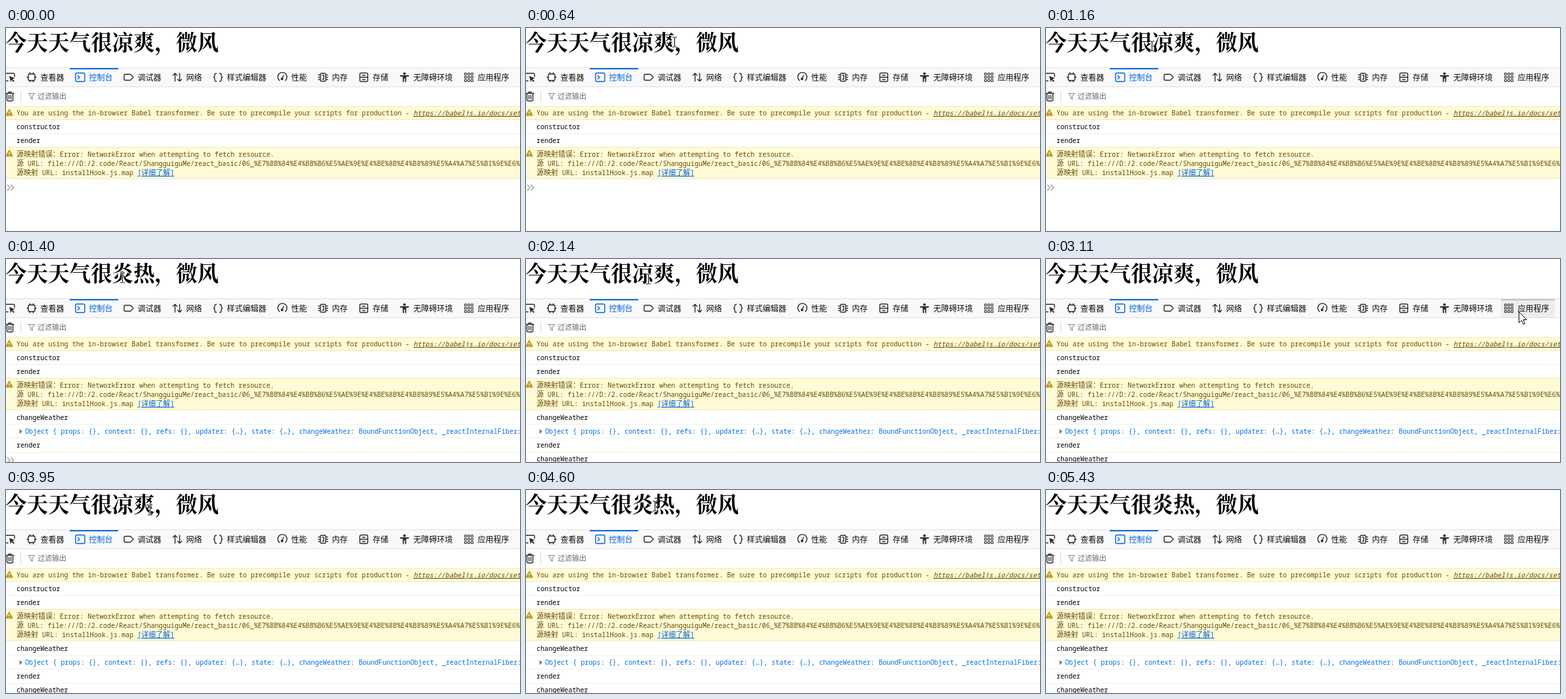
An HTML page for the animation above (5680 ms loop, 783x309 px).

```html
<!DOCTYPE html>
<html lang="zh-CN">
<head>
<meta charset="utf-8">
<title>Console</title>
<style>
  html, body { margin: 0; width: 100%; height: 100%; overflow: hidden; background: #fff; }
  svg { display: block; width: 783px; height: 309px; }
  text { white-space: pre; font-family: "Noto Sans CJK SC", "Noto Sans CJK", sans-serif; }
  .title { font: 700 32.5px "Noto Serif CJK SC", "Noto Sans CJK SC", "Noto Sans CJK", serif; }
  .tab { font-size: 12px; fill: #0c0c0d; }
  .tab.on { fill: #0060df; }
  .log { font: 500 10.08px "Noto Sans Mono", "Noto Sans CJK SC", monospace; fill: #000; }
  .log .han { font: 11px "Noto Sans CJK SC", "Noto Sans CJK", sans-serif; }
  .log.warn { fill: #6a4a00; }
  .log.obj { fill: #0070e0; }
  .sep { fill: #4a4a50; }
  .link { fill: #0060df; text-decoration: underline; }
  .url { font-style: italic; text-decoration: underline; fill: #5e4300; }
  .icon { fill: none; stroke: #2a2a2e; stroke-width: 1.4; stroke-linecap: round; stroke-linejoin: round; }
  .icon.on { stroke: #0060df; }
  .icon .solid { fill: #2a2a2e; stroke: none; }
</style>
</head>
<body>
<svg id="stage" viewBox="0 0 783 309"></svg>
<script>
const LOOP = 5680;

const rect = (x, y, w, h, fill) => `<rect x="${x}" y="${y}" width="${w}" height="${h}" fill="${fill}"/>`;
const han = s => s.replace(/[\u4e00-\u9fff\uff1a]+/g, m => `<tspan class="han">${m}</tspan>`);
const log = (y, s, kind = '', x = 16) => `<text class="log ${kind}" x="${x}" y="${y}">${s}</text>`;
const rule = y => rect(0, y, 783, 1, '#f0f0f1');
const dots = Array.from({ length: 9 }, (_, i) =>
  `<rect x="${1.5 + i % 3 * 5}" y="${1.5 + Math.floor(i / 3) * 5}" width="3" height="3" rx=".8" stroke-width="1.1"/>`).join('');

// name and icon drawn in a 16px box
const ICONS = {
  查看器: '<rect x="3" y="3" width="10" height="10" rx="2"/><path d="M5.5 3V1M10.5 3V1M5.5 15v-2M10.5 15v-2M1 8h2M13 8h2"/>',
  控制台: '<rect x="1" y="1.5" width="14" height="13" rx="2"/><path d="M4.5 5.5L7 8l-2.5 2.5"/>',
  调试器: '<path d="M2.5 3.5h8L15 8l-4.5 4.5h-8q-1.5 0-1.5-1.5V5q0-1.5 1.5-1.5z"/>',
  网络: '<path d="M4.5 14V2M1.500 5l3-3 3 3M11.500 2v12M8.500 11l3 3 3-3"/>',
  样式编辑器: '<path d="M5.5 2Q3 2 3 4.500T1.500 8Q3 8 3 11.500T5.500 14M10.500 2Q13 2 13 4.500T14.500 8Q13 8 13 11.500T10.500 14"/>',
  性能: '<path d="M3.5 13A7 7 0 1 1 12.500 13M7.500 10L10 5"/><circle class="solid" cx="7.5" cy="10.5" r="2"/>',
  内存: '<rect x="4" y="2" width="8" height="12" rx="1.5"/><path d="M1 4.500h2M1 8h2M1 11.500h2M13 4.500h2M13 8h2M13 11.500h2M7 5h2v6H7"/>',
  存储: '<rect x="2" y="1.5" width="12" height="13" rx="2"/><path d="M2 8h12M6 5h4M6 11.500h4"/>',
  无障碍环境: '<circle class="solid" cx="8" cy="2.5" r="2"/><path d="M2 6h12M8 6v3M6.300 6v8.500M9.700 6v8.500" stroke-width="1.8"/>',
  应用程序: dots
};
let edge = 23;
const TABS = Object.entries(ICONS).map(([name, icon]) => {
  const w = 38 + 12 * name.length, x = edge;
  edge += w;
  return { name, icon, x, w, on: name === '控制台' ? 'on' : '' };
});
const tab = ({ name, icon, x, on }) =>
  `<g class="icon ${on}" transform="translate(${x + 8} 67)">${icon}</g>
   <text class="tab ${on}" x="${x + 29.5}" y="79.5">${name}</text>`;

const warnBox = (y, h) => `${rect(0, y, 783, h, '#fffbd6')}
  ${rect(0, y, 783, 1, '#f3eabb')}${rect(0, y + h - 1, 783, 1, '#f3eabb')}
  <path d="M5 ${y + 5}l5 9H0z" fill="#be9b2b" stroke="#be9b2b" stroke-width="1.5" stroke-linejoin="round"/>
  <path d="M5 ${y + 8}v3M5 ${y + 12.800}v.6" stroke="#fffbd6" stroke-width="1.4"/>`;

const objectLine = 'Object { props: {}, context: {}, refs: {}, updater: {…}, state: {…}, changeWeather: BoundFunctionObject, _reactInternalFiber: {…}'
  .replace(/:/g, '<tspan class="sep">:</tspan>');
const beam = 'M-3.5 -7.5H-1L0 -6.5L1 -7.5H3.5M0 -6.5V6.5M-3.5 7.5H-1L0 6.5L1 7.5H3.5';

document.getElementById('stage').innerHTML = `
  <text class="title" id="title" x="-1" y="33.5"></text>
  ${rect(0, 60, 783, 30, '#f9f9fa')}
  ${rect(0, 60, 783, 1, '#e0e0e2')}
  ${rect(0, 89, 783, 1, '#e0e0e2')}
  <g id="hover">${rect(0, 61, 82, 28, '#ededf0')}${rect(0, 61, 82, 2, '#c4c4c6')}</g>
  ${rect(97, 61, 74, 2, '#0a70d8')}
  <g class="icon">
    <path d="M-2 69H11.5Q13 69 13 70.5V74M-2 80.5H3"/>
    <path class="solid" d="M5 73l8.5 3.5-3.7 1.3 3.2 3.2-1.3 1.3-3.2-3.2-1.3 3.5z"/>
  </g>
  ${TABS.map(tab).join('')}
  ${rect(22, 95, 1, 18, '#d7d7db')}
  <g class="icon">
    <path d="M0 99.5H12M4 99.5V97.5H8V99.5M1.5 99.5V109q0 2 2 2H8.5q2 0 2-2V99.5M4.5 102.5V108M7.5 102.5V108"/>
    <path d="M34.5 99.5h9l-3.3 4.5v4.5l-2.4-1.5v-3z" stroke="#8a8a8e" stroke-width="1.1"/>
  </g>
  <text x="48" y="108" font-size="11" fill="#68686e">过滤输出</text>
  ${warnBox(119, 21)}
  ${log(133, 'You are using the in-browser Babel transformer. Be sure to precompile your scripts for production - <tspan class="url">https://babeljs.io/docs/setup/</tspan>', 'warn')}
  ${log(154, 'constructor')}
  ${rule(160)}
  ${log(175, 'render')}
  ${warnBox(181, 49)}
  ${log(196, han('源映射错误：Error: NetworkError when attempting to fetch resource.'), 'warn')}
  ${log(210, han('源 URL: file:///D:/2.code/React/ShangguiguMe/react_basic/06_%E7%BB%84%E4%BB%B6%E5%AE%9E%E4%BE%8B%E4%B8%89%E5%A4%A7%E5%B1%9E%E6%80%A7'), 'warn')}
  ${log(224, han('源映射 URL: installHook.js.map ') + `<tspan class="link">${han('[详细了解]')}</tspan>`, 'warn')}
  <g id="first">
    ${log(245, 'changeWeather')}
    ${rule(251)}
    <path d="M20.5 258.5l4.5 4-4.5 4z" fill="#86868a"/>
    ${log(266, objectLine, 'obj', 29)}
    ${rule(272)}
    ${log(287, 'render')}
    ${rule(294)}
  </g>
  <g id="second">${log(308, 'changeWeather')}</g>
  <path id="prompt" d="M2 -4.5L6 0L2 4.5M7.5 -4.5L11.5 0L7.5 4.5" fill="none" stroke="#a0a0a5" stroke-width="1.5"/>
  <path id="arrow" d="M0 0V16.5L3.8 13L6.4 18.8L9 17.7L6.5 12H11.7Z" fill="#fff" stroke="#000"/>
  <g id="beam" fill="none">
    <path d="${beam}" stroke="#fff" stroke-width="2.6"/>
    <path d="${beam}" stroke="#000"/>
  </g>`;

// pointer key points: time, x, y
const PATH = [
  [0, 763, 324], [640, 226, 21], [900, 153, 27], [1000, 153, 27], [1400, 177, 28],
  [2060, 178, 28], [2140, 186, 30], [2460, 725, 74], [2700, 718, 282],
  [3110, 720, 80], [3300, 718, 276], [3460, 718, 276], [3950, 219, 30],
  [4030, 193, 22], [4700, 196, 24], [5350, 759, 307], [5430, 800, 330], [LOOP, 800, 330]
];
const CLICKS = [1230, 1890, 4190];

const $ = id => document.getElementById(id);
const show = (id, on) => $(id).setAttribute('visibility', on ? 'visible' : 'hidden');
const place = (id, x, y) => $(id).setAttribute('transform', `translate(${x} ${y})`);

function pointer(t) {
  const i = PATH.findIndex(p => p[0] > t);
  const [t0, x0, y0] = PATH[i - 1], [t1, x1, y1] = PATH[i];
  const k = (1 - Math.cos(Math.PI * (t - t0) / (t1 - t0))) / 2;
  return { x: Math.round(x0 + (x1 - x0) * k), y: Math.round(y0 + (y1 - y0) * k) };
}

function draw(t) {
  const clicks = CLICKS.filter(c => t >= c).length;
  $('title').textContent = `今天天气很${clicks % 2 ? '炎热' : '凉爽'}，微风`;
  show('first', clicks > 0);
  show('second', clicks > 1);
  show('prompt', clicks < 2);
  place('prompt', 0, clicks ? 306.5 : 243);

  const { x, y } = pointer(t);
  const overText = y < 44 && x < 330;
  show('beam', overText);
  show('arrow', !overText && t >= 80);
  place(overText ? 'beam' : 'arrow', x + 0.5, y + 0.5);

  const last = TABS[TABS.length - 1];
  show('hover', y >= 61 && y < 90 && x >= last.x);
  place('hover', last.x + 4, 0);
}

const start = performance.now();
function tick() {
  draw((performance.now() - start) % LOOP);
  requestAnimationFrame(tick);
}
tick();
</script>
</body>
</html>
```
